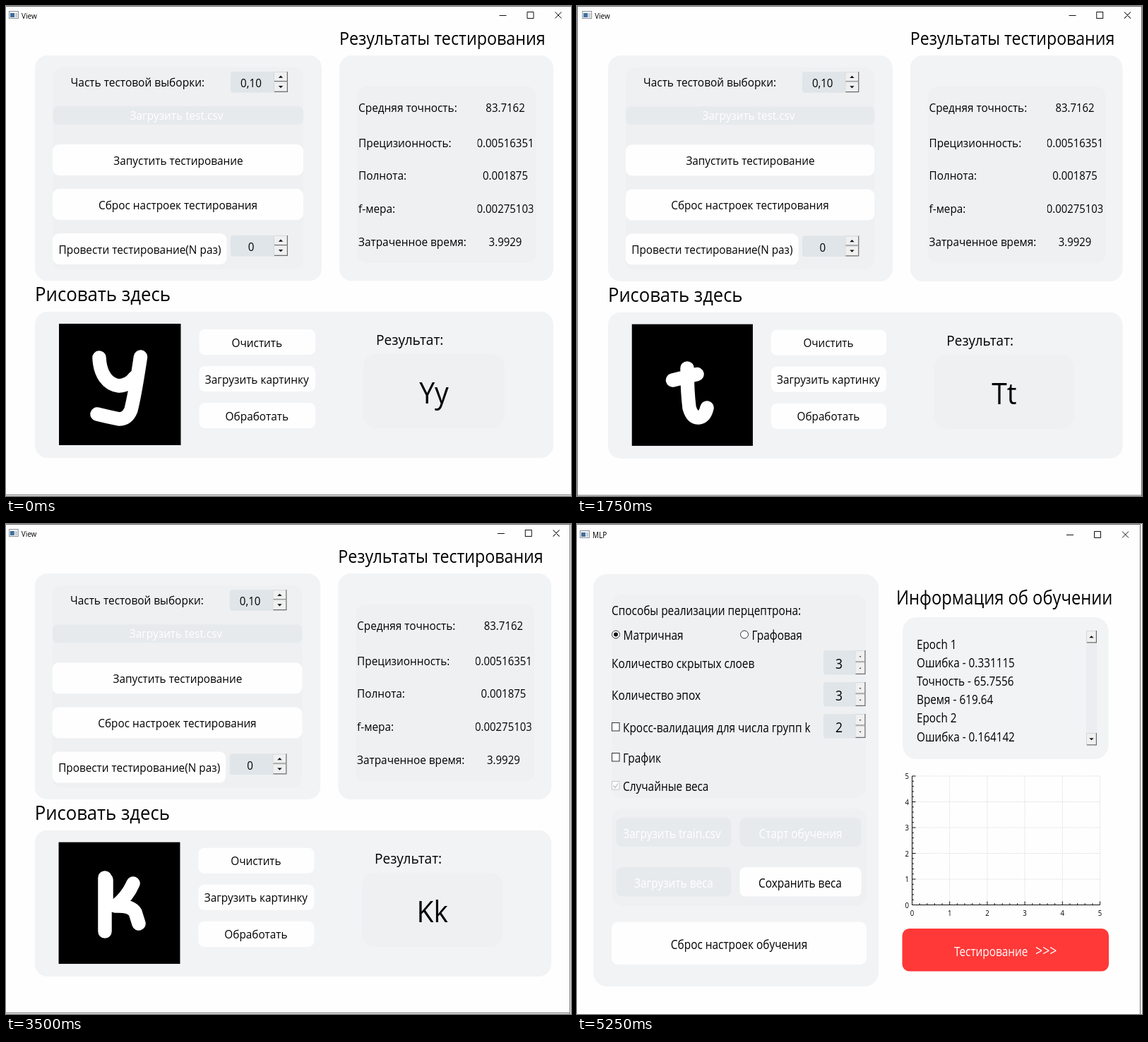
Write an HTML page that moves like this. It is 800x694 px and loops after 7000 ms.

```html
<!DOCTYPE html>
<html lang="ru">
<head>
<meta charset="utf-8">
<title>View</title>
<style>
html, body { margin: 0; width: 100%; height: 100%; overflow: hidden; background: #fefefe; }
svg { display: block; width: 800px; height: 694px; }
text { font-family: "Open Sans", "Noto Sans", sans-serif; fill: #000; white-space: pre; }
.panel { fill: #f1f3f5; }
.group { fill: #eff0f2; }
.btn { fill: #fefefe; }
.off { fill: #e6eaed; }
.field { fill: #dfe5e8; }
.pale { fill: #fff; }
.line { fill: none; stroke: #111; }
.ink { fill: none; stroke: #fff; stroke-width: 19.5; stroke-linecap: round; stroke-linejoin: round; }

/* four scenes of 1.75 s each; the first three share one window */
.scene { visibility: hidden; animation: show 7s step-end infinite; }
.s1 { animation-delay: -5.25s; }
.s2 { animation-delay: -3.5s; }
.s3 { animation-delay: -1.75s; }
#test { animation: test 7s step-end infinite; }
#shift { animation: shift 7s step-end infinite; }
@keyframes show { 0% { visibility: visible; } 25%, 100% { visibility: hidden; } }
@keyframes test { 0% { visibility: visible; } 75%, 100% { visibility: hidden; } }
@keyframes shift {
  0% { transform: matrix(1, 0, 0, 1, 0, 0); }
  25% { transform: matrix(.9925, 0, 0, 1.0015, 3.3, 0); }
  50%, 100% { transform: matrix(.9966, 0, 0, 1.0015, -.2, 0); }
}
</style>
</head>
<body>
<svg id="stage" viewBox="0 0 800 694"></svg>
<script>
const box = (x, y, w, h, r, cls) =>
  `<rect x="${x}" y="${y}" width="${w}" height="${h}" rx="${r}" class="${cls}"/>`;
const path = (d, attrs = 'class="line"') => `<path d="${d}" ${attrs}/>`;

// both windows are shown taller than wide, each by its own ratio
const type = ratio => (x, y, str, size = 15.4, anchor = 'start', cls = '') =>
  `<text transform="translate(${x} ${y}) scale(1 ${ratio})" font-size="${size}" ` +
  `text-anchor="${anchor}" class="${cls}">${str}</text>`;
const text = type(1.06), tall = type(1.18);
const mid = (x, y, str, size, cls) => text(x, y, str, size, 'middle', cls);
const tallMid = (x, y, str, size, cls) => tall(x, y, str, size, 'middle', cls);

// raised button with an up (-1) or down (1) arrow
function arrow(x, y, w, h, dir, size) {
  const cx = x + w / 2, cy = y + h / 2;
  return `<rect x="${x}" y="${y}" width="${w}" height="${h}" fill="#f0f0f1"/>` +
    path(`M${x + .5} ${y + h}V${y + .5}H${x + w}`, 'fill="none" stroke="#d5d8da"') +
    path(`M${x + 1} ${y + h - .6}H${x + w - .6}V${y}`, 'fill="none" stroke="#6c6c6c" stroke-width="1.2"') +
    path(`M${cx - size} ${cy - dir * size / 2}h${2 * size}l${-size} ${dir * size}z`, 'fill="#111"');
}

function spin(x, y, w, h, bw, size) {
  return box(x, y, w, h, 4, 'field') +
    arrow(x + w - bw, y, bw, h / 2 - .5, -1, size) +
    arrow(x + w - bw, y + h / 2 - .5, bw, h / 2, 1, size);
}

function titleBar(name, y, right, label) {
  return `<rect x="4.5" y="${y - 5.5}" width="13" height="10" fill="#f4f6f8" stroke="#8a9199"/>` +
    `<rect x="6" y="${y - 3}" width="6" height="6" fill="#3f6f9c"/>` +
    `<rect x="13" y="${y - 3}" width="3" height="6" fill="#c5cbd1"/>` + label(22, y + 4.5, name, 10) +
    path(`M${right - 88} ${y + .5}h10M${right - 48.5} ${y - 4.5}h9v9h-9zM${right - 9} ${y - 4.5}l9 9m0-9l-9 9`);
}

function testWindow() {
  let s = titleBar('View', 13, 786.5, text);
  s += text(472, 55, 'Результаты тестирования', 23.3) + text(41, 418, 'Рисовать здесь', 25.8);

  s += box(41, 70, 406, 319.5, 18, 'panel') + box(66, 87, 355, 286, 14, 'group');
  s += text(91.5, 114, 'Часть тестовой выборки:', 15.5);
  s += spin(318, 93, 81, 29.5, 20, 3.2) + mid(347, 115, '0,10', 15.2);
  s += box(66.5, 142, 354.5, 26, 7, 'off') + mid(241.5, 161, 'Загрузить test.csv', 15.4, 'pale');
  s += box(66, 196, 355, 44, 9, 'btn') + mid(244, 224.5, 'Запустить тестирование');
  s += box(66, 259, 355, 44, 9, 'btn') + mid(243.5, 287.5, 'Сброс настроек тестирования');
  s += box(66, 322, 246.5, 44, 9, 'btn') + mid(189.5, 350.5, 'Провести тестирование(N раз)');
  s += spin(318, 325, 81, 29.5, 20, 3.2) + mid(347, 347, '0', 15.2);

  s += box(472, 70, 303, 319.5, 18, 'panel') + box(497, 114, 254, 250, 14, 'group');
  const rows = [
    [150, 'Средняя точность:', '83.7162'],
    [199.5, 'Прецизионность:', '0.00516351'],
    [246, 'Полнота:', '0.001875'],
    [293, 'f-мера:', '0.00275103'],
    [339.5, 'Затраченное время:', '3.9929']
  ];
  s += '<clipPath id="cell"><rect x="667.5" y="120" width="79" height="240"/></clipPath>';
  s += rows.map(([y, label]) => text(499, y, label)).join('');
  s += '<g clip-path="url(#cell)">' + rows.map(r => mid(707, r[0], r[2], 15)).join('') + '</g>';

  s += box(41, 433, 734, 207, 18, 'panel');
  s += '<rect x="75" y="450" width="172.5" height="172"/>';
  ['Очистить', 'Загрузить картинку', 'Обработать'].forEach((label, i) => {
    s += box(273.5, 458 + 52 * i, 164.5, 36, 8, 'btn') + mid(355.3, 482.5 + 52 * i, label);
  });
  s += text(524, 480, 'Результат:', 19.1) + box(506, 493, 200, 105, 18, 'group');
  ['Yy', 'Tt', 'Kk'].forEach((t, i) => {
    s += `<g class="scene s${i}">${mid(606, 563, t, 39.2)}</g>`;
  });
  return s;
}

const letters = [
  'M132 498C133 522 144 536 160 538Q174 537 182 526M190.500 497C187 520 183 548 177 572Q172 585 160 585Q145 582 129 578',
  'M156 513C156 535 157 553 159 569Q163 583 172 583Q181 582 184 569M135.500 530L170 521.500',
  'M140 501V577M142 504V530M180 509Q172 528 155 541Q177 540 183 550L188 566'
];

const edges = [
  'M0 .5H800M0 692.500H800',
  'M0 .5H800M.5 0V694M799.500 0V694M0 693H800',
  'M0 .5H800M798.500 0V694M0 692.500H799'
];

function chart() {
  const x0 = 474.5, y0 = 539.5, dx = 53.2, dy = 36.5;
  let grid = '', ticks = `M${x0} ${y0 - 5 * dy}V${y0}H${x0 + 5 * dx}`, s = '';
  for (let i = 0; i <= 25; i++) {
    const len = i % 5 ? 2.5 : 5, x = x0 + i * dx / 5, y = y0 - i * dy / 5;
    ticks += `M${x} ${y0}v${-len}M${x0} ${y}h${len}`;
    if (i % 5) continue;
    if (i) grid += `M${x} ${y0}v${-5 * dy}M${x0} ${y}h${5 * dx}`;
    s += tallMid(x, 555, i / 5, 9.6) + tall(470, y + 4, i / 5, 9.6, 'end');
  }
  return path(grid, 'fill="none" stroke="#c8c8c8" stroke-dasharray="1 2"') + path(ticks) + s;
}

function trainWindow() {
  let s = titleBar('MLP', 15, 781, tall);
  s += box(23, 71, 404, 584, 20, 'panel') + box(49, 100, 360, 288, 16, 'group') +
    box(49, 403, 361, 138, 16, 'group');

  s += tall(49, 129, 'Способы реализации перцептрона:');
  [[55, 'Матричная'], [237, 'Графовая']].forEach(([x, label], i) => {
    s += `<circle cx="${x}" cy="156.500" r="5.500" fill="#fff" stroke="#333"/>` +
      (i ? '' : `<circle cx="${x}" cy="156.500" r="3" fill="#111"/>`) + tall(x + 10.5, 164, label);
  });

  s += tall(49, 204, 'Количество скрытых слоев') + tall(49, 249, 'Количество эпох');
  [3, 3, 2].forEach((n, i) => {
    const y = 179 + 45 * i;
    s += spin(349, y, 59.5, 34.5, 15, 1.5) + tallMid(371, y + 26, n, 17.5);
  });

  const checks = [
    [281.5, 'Кросс-валидация для числа групп k'],
    [324.5, 'График'],
    [364.5, 'Случайные веса']
  ];
  checks.forEach(([y, label], i) => {
    const color = i == 2 ? '#c4c6c8' : '#333';
    s += `<rect x="49.500" y="${y}" width="10.500" height="11.500" fill="#fff" stroke="${color}"/>` +
      (i == 2 ? path(`M51.500 ${y + 6}l2.500 3l4-6`, 'fill="none" stroke="#b8babc" stroke-width="1.3"') : '') +
      tall(65, y + 13.5, label);
  });

  s += box(55.5, 416, 163, 41, 8, 'off') + tallMid(134.5, 444.5, 'Загрузить train.csv', 15.4, 'pale');
  s += box(230.5, 416, 172, 41, 8, 'off') + tallMid(316.5, 444.5, 'Старт обучения', 15.4, 'pale');
  s += box(55.5, 486, 163, 41.5, 8, 'off') + tallMid(137, 514.5, 'Загрузить веса', 15.4, 'pale');
  s += box(230.5, 486, 172, 41.5, 8, 'btn') + tallMid(316, 514.5, 'Сохранить веса');
  s += box(49, 563.5, 361, 60.5, 9, 'btn') + tallMid(229.5, 602, 'Сброс настроек обучения');

  s += tall(452, 114, 'Информация об обучении', 23.7) + box(461, 132, 291.5, 201, 20, 'panel');
  ['Epoch 1', 'Ошибка - 0.331115', 'Точность - 65.7556', 'Время - 619.64', 'Epoch 2', 'Ошибка - 0.164142']
    .forEach((line, i) => { s += tall(481, 177 + 26.1 * i, line, 15.3); });
  s += '<rect x="721" y="151" width="15" height="163" fill="#ecedf1"/>' +
    arrow(721, 151, 15, 17.5, -1, 3.2) + arrow(721, 296, 15, 17.5, 1, 3.2);

  s += chart();
  s += '<rect x="460.500" y="573" width="292.500" height="60.500" rx="10" fill="#ff3838"/>' +
    tall(534, 612, 'Тестирование', 15.4, 'start', 'pale') + tall(649, 612, '&gt;&gt;&gt;', 17.8, 'start', 'pale');
  s += path('M0 .5H797M797.500 0V694', 'fill="none" stroke="#6a6a6a"');
  return s;
}

document.getElementById('stage').innerHTML =
  '<rect width="800" height="694" fill="#fefefe"/>' +
  `<g id="test"><g id="shift">${testWindow()}</g></g>` +
  letters.map((d, i) => `<g class="scene s${i}">` + path(d, 'class="ink"') +
    path(edges[i], 'fill="none" stroke="#6a6a6a"') + '</g>').join('') +
  `<g class="scene s3">${trainWindow()}</g>`;
</script>
</body>
</html>
```
